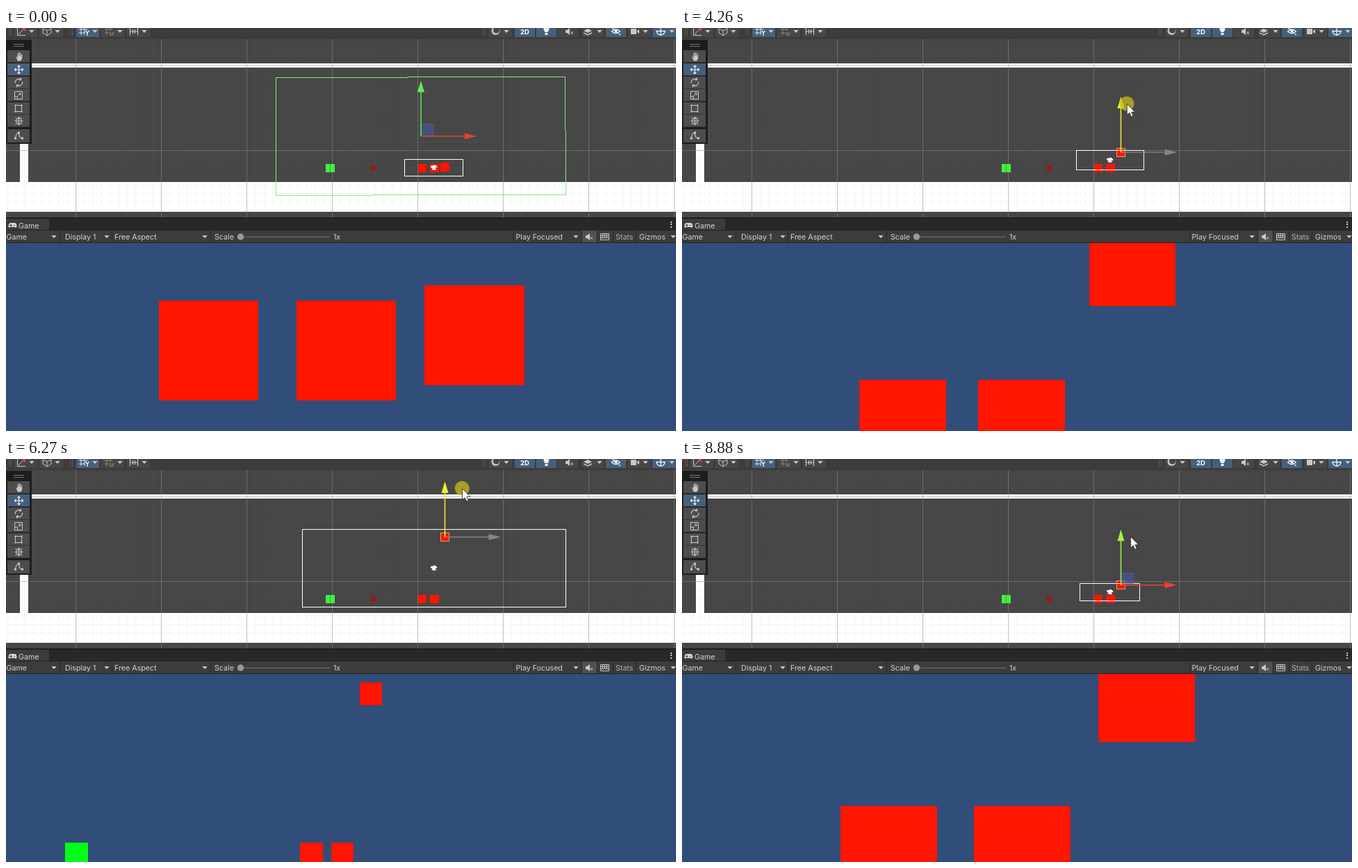
An HTML page with a canvas that plays this animation: 964x581 px, repeating every 9.04 s.

```html
<!DOCTYPE html>
<html lang="en">
<head>
<meta charset="utf-8">
<title>Group camera</title>
<style>
html, body { margin: 0; width: 100%; height: 100%; overflow: hidden; background: #314d79; }
canvas { display: block; }
</style>
</head>
<body>
<canvas id="stage" width="964" height="581"></canvas>
<script>
const ctx = document.getElementById('stage').getContext('2d');
const LOOP = 9040;
const RED = '#ff1500', ICON = '#c8c8c8';
const CAM_X = 615.6, BASE_Y = 202.4, UNIT = 12.64;
const GAME_TOP = 310, GAME_MID = 454;

// [time, value] knots
const HEIGHT = [[3790, 200.5], [3850, 196], [4680, 162], [4860, 155.6], [5590, 128.4], [6270, 112.5],
  [6480, 105], [6550, 105], [6720, 98], [7400, 98], [7630, 109.6], [8280, 153.7], [8800, 181.7]];
const DRAG_X = [[3790, 634], [3850, 634], [4860, 649.5], [6270, 656.5], [7630, 658], [8280, 652], [8800, 645.5]];

function track(knots, t) {
  if (t <= knots[0][0]) return knots[0][1];
  for (let i = 1; i < knots.length; i++) {
    const [t0, a] = knots[i - 1], [t1, b] = knots[i];
    if (t < t1) return a + (b - a) * (t - t0) / (t1 - t0);
  }
  return knots[knots.length - 1][1];
}
const mix = (a, b, k) => a + (b - a) * k;
const smooth = k => k * k * (3 - 2 * k);

function box(x, y, w, h, color) {
  ctx.fillStyle = color;
  ctx.fillRect(x, y, w, h);
}
// Filled square with its edges on whole pixels
function square(cx, cy, size, color) {
  const x = Math.round(cx - size / 2), y = Math.round(cy - size / 2);
  box(x, y, Math.round(cx + size / 2) - x, Math.round(cy + size / 2) - y, color);
}
function frame(x, y, w, h, color) {
  ctx.strokeStyle = color;
  ctx.lineWidth = 1;
  ctx.strokeRect(Math.round(x) + .5, Math.round(y) + .5, Math.round(w) - 1, Math.round(h) - 1);
}
function disc(x, y, r, color) {
  ctx.fillStyle = color;
  ctx.beginPath();
  ctx.arc(x, y, r, 0, 7);
  ctx.fill();
}
function shape(d, color, x = 0, y = 0) {
  ctx.save();
  ctx.translate(x, y);
  ctx.fillStyle = color;
  ctx.fill(new Path2D(d));
  ctx.restore();
}
function line(d, color, x = 0, y = 0, width = 1) {
  ctx.save();
  ctx.translate(x, y);
  ctx.strokeStyle = color;
  ctx.lineWidth = width;
  ctx.stroke(new Path2D(d));
  ctx.restore();
}
function label(text, x, y, color = '#d2d2d2', font = '10.7px') {
  ctx.font = font + ' Inter, Roboto, sans-serif';
  ctx.fillStyle = color;
  ctx.fillText(text, x, y);
}
const caret = (x, y) => shape('M-3.7 -2H3.7L0 2Z', ICON, x, y);

function drawGrid() {
  const minor = 'rgba(128,128,128,.08)', major = 'rgba(140,140,140,.5)';
  for (let x = 1.6; x < 964; x += 12.3) box(Math.round(x), 16, 1, 257, minor);
  for (let y = 29; y < 273; y += 12.3) box(0, Math.round(y), 964, 1, minor);
  for (let i = 0; i < 8; i++) box(Math.round(99.5 + i * 123), 16, 1, 257, major);
  box(0, 54, 964, 1, major);
  box(0, 176, 964, 1, major);
}

function drawRoom() {
  box(0, 16, 964, 257, '#464646');
  box(20, 51, 12, 172, '#fff');
  box(20, 51, 944, 6, '#fff');
  box(0, 222, 964, 43, '#fff');
  drawGrid();
}

function drawTopBar() {
  box(0, 0, 964, 16, '#3c3c3c');
  for (const [x, w, on] of [[12, 33], [48, 34], [101, 33, 1], [137, 33], [174, 33], [695, 33], [732, 29, 1],
    [763, 29, 1], [794, 29], [829, 31], [863, 29, 1], [895, 33], [930, 34, 1]])
    box(x, 0, w, 13, on ? '#46607c' : '#474747');
  for (const x of [4, 92, 686]) line('M.5 0V11M3.5 0V11', '#5c5c5c', x, 0);
  for (const x of [37, 74, 128, 164, 199, 720, 854, 920, 958]) caret(x, 5);
  line('M16.5 0V10.5H28M18 9L26 1', ICON);
  shape('M23 0H28V5Z', '#d2543c');
  line('M53 1L59 4L65 1V7L59 11L53 7ZM59 4V11', ICON);
  line('M105 2H118M105 7H114M108 0V10M113 0V10', '#e4e4e4');
  line('M114.5 4L117 7L119.5 4M117 7V11', '#fff', 0, 0, 1.3);
  line('M142 2H153M142 7H148M145 0V10M150 0V4', '#858585');
  line('M150 6V8A2 2 0 0 0 154 8V6', '#858585', 0, 0, 1.5);
  line('M178.5 0V10M189.5 0V10M179 5H189M182.5 2V8M185.5 2V8', ICON, 0, 0, 1.2);
  disc(704.5, 4, 6, ICON);
  disc(705.5, 3, 4.6, '#474747');
  label('2D', 740, 8.5, '#fff', 'bold 9.5px');
  shape('M773.5 0H781.5Q782 3 779.5 6H775.5Q773 3 773.5 0ZM775.5 7H779.5V10H775.5Z', '#f0f0f0');
  shape('M805 3H807L811 0V10L807 7H805Z', ICON);
  line('M812.5 5L816 9M816 5L812.5 9', ICON);
  shape('M831 4L837 1L843 4L837 7Z', ICON);
  line('M831 7L837 10L843 7', ICON, 0, 0, 1.4);
  line('M871.5 5Q877.5 -1 883.5 5Q877.5 10 871.5 5ZM872 0L884 10', '#f0f0f0', 0, 0, 1.3);
  disc(877.5, 4.5, 2, '#f0f0f0');
  shape('M899 1H907V9H899ZM908 4L911 2V8L908 6Z', ICON);
  line('M936 4A6 6 0 0 0 948 4M935 4.5H949M942 0V11', '#f0f0f0', 0, 0, 1.3);
}

function drawTools() {
  box(0, 17, 37, 150, '#1d1d1d');
  line('M11 23.5H26M11 26.5H26', '#777');
  [32, 51, 70, 88, 107, 125, 146].forEach((y, i) => box(2, y, 32, i === 6 ? 19 : 17.5, i === 1 ? '#46607c' : '#4d4d4d'));
  shape('M-5 -1L-2 2V-4.5H-.8V-1H-.2V-6H1V-1H1.6V-5H2.8V0H3.4V-3H4.7V2Q4 6 2 6.5H-1.5Z', ICON, 18.5, 41);
  line('M-6 0H6M0 -6V6M-4 -2L-6 0L-4 2M4 -2L6 0L4 2M-2 -4L0 -6L2 -4M-2 4L0 6L2 4', '#f0f0f0', 18.5, 60, 1.2);
  line('M-5 1A5 5 0 0 1 3 -4M5 -1A5 5 0 0 1 -3 4M3 -7V-3.5H0M-3 7V3.5H0', ICON, 18.5, 78.5, 1.2);
  line('M-5.5 -5.5H5.5V5.5H-5.5ZM-5.5 1.5H-1.5V5.5M-1 1L3 -3M0 -3H3V0', ICON, 18, 97);
  line('M-4.5 -4.5H4.5V4.5H-4.5Z', ICON, 18, 116);
  for (const x of [-5, 4]) for (const y of [-5, 4]) box(17.5 + x, 115.5 + y, 2, 2, ICON);
  line('M-6 0H6M0 -6V6M-2 -4L0 -6L2 -4M-2 4L0 6L2 4M-4 0A4 4 0 0 1 4 0A4 4 0 0 1 -4 0M-5 -5L-3 -3M5 -5L3 -3M-5 5L-3 3M5 5L3 3', ICON, 18.5, 134);
  line('M-5 4Q-4 -4 0 -4Q0 4 5 4', ICON, 18.5, 155, 1.2);
  for (const [x, y] of [[-5, 4], [0, -4], [5, 4]]) box(17 + x, 153.5 + y, 3, 3, ICON);
}

function drawGameBar() {
  box(0, 273, 964, 2, '#1e1e1e');
  box(0, 275, 964, 17, '#282828');
  box(0, 275, 62, 17, '#3c3c3c');
  box(0, 291, 964, 1, '#262626');
  box(0, 292, 964, 18, '#3c3c3c');
  box(0, 309, 964, 1, '#232323');
  shape('M6 281H13Q15.5 282 15.5 286Q15 289 12.5 287H6.5Q4 289 3.5 286Q3.5 282 6 281Z', '#d8d8d8');
  line('M5 284.5H9M7 282.5V286.5M11 284.5H13', '#3c3c3c');
  label('Game', 18, 288.5);
  for (const y of [279, 282, 286]) box(956, y, 2, 2, ICON);
  box(829, 292, 21, 17, '#505050');
  for (const x of [77, 152, 294, 730, 828, 850, 873, 906]) box(x, 292, 1, 17, '#262626');
  for (const x of [69, 145, 286, 820, 960]) caret(x, 301);
  label('Game', .5, 305);
  label('Display 1', 85, 305);
  label('Free Aspect', 156, 305);
  label('Scale', 300, 305);
  box(338, 300.5, 128, 1.5, '#626262');
  disc(337.5, 301, 4.7, '#999');
  label('1x', 471, 305);
  label('Play Focused', 733.5, 305);
  shape('M834 299H836L840 296V306L836 303H834Z', ICON);
  line('M841 301L844 304.5M844 301L841 304.5', ICON);
  line('M855.5 296.5H867.5V305.5H855.5ZM856 299.5H867M856 302.5H867M858.5 297V303M861.5 297V303M864.5 297V303', ICON);
  label('Stats', 877, 305, '#b0b0b0');
  label('Gizmos', 911, 305);
}

function gizmo(x, y, green, red, plane) {
  if (plane) {
    box(x, Math.round(y - 18), 18, 18, 'rgba(70,92,170,.52)');
    frame(x, y - 18, 18, 18, 'rgba(80,110,190,.5)');
  }
  line('M0 0H64', red, x, y, 1.4);
  shape('M63 -4.5L80.5 0L63 4.5Z', red, x, y);
  line('M0 0V-65', green, x, y, 1.5);
  shape('M-5 -63.5L0 -80L5 -63.5Z', green, x, y);
}

function drawScene(t, y, w) {
  const camY = (y + BASE_Y) / 2, h = w * 288 / 964;
  const picked = t >= 1940, dragging = t >= 3600 && t < 8850, hover = t >= 3450 && t < 8850;

  square(466.4, 202, UNIT, '#40f040');
  box(466, 196, 1, 12, '#35a835');
  square(599, 202.1, UNIT, RED);
  square(616.3, 202.1, UNIT, RED);
  square(631.6, y, UNIT, RED);
  disc(528.5, 202, 4.3, '#981818');
  shape('M-5 -1Q-4 -4 -1 -3Q1 -5 3 -3L5 -1L3 3H-3L-2 1Z', '#fff', CAM_X, camY);
  box(Math.round(CAM_X) + 2, Math.round(camY), 2, 2, '#c03020');
  frame(CAM_X - w / 2, camY - h / 2, w, h, '#fff');

  if (!picked) {
    line('M388.5 240.5V71.5H578V70.5H804.5V147.5M805.5 147.5V240.5H528V241.5H388.5V240', '#86ee82');
    gizmo(597, 156, '#5eec58', '#e0432c', true);
  } else {
    frame(631.6 - UNIT / 2, y - UNIT / 2, UNIT, UNIT, '#f4a05a');
    gizmo(631.5, y, hover ? '#f4ee38' : '#a2f04e', dragging ? '#868686' : '#f0402a', !dragging);
  }
}

function drawGame(gap, w) {
  const s = 964 / w, half = gap / 2 * s;
  const cube = (dx, dy, color) => square(482 + dx * s, GAME_MID + dy, UNIT * s, color);
  ctx.save();
  ctx.beginPath();
  ctx.rect(0, GAME_TOP, 964, 581 - GAME_TOP);
  ctx.clip();
  box(0, GAME_TOP, 964, 271, '#314d79');
  cube(-149.9, half, '#00ff18');
  cube(-16.75, half, RED);
  cube(.67, half, RED);
  cube(16.9, -half, RED);
  ctx.restore();
}

function drawCursor(t, y) {
  if (t < 2480) return;
  let x, cy;
  if (t < 3390) {
    const k = smooth(Math.min(1, (t - 2480) / 880));
    x = mix(12, 624, k);
    cy = mix(24, 126, k);
  } else {
    const k = smooth(Math.min(1, (t - 3390) / 210));
    x = t < 3790 ? mix(624, 634, k) : track(DRAG_X, t);
    cy = mix(-5, 0, k) + y - 69.7;
  }
  if (t >= 3600 && t < 8850) disc(x - .3, cy - .5, 10.5, 'rgba(200,188,28,.75)');
  const arrow = 'M0 0V16L3.7 12.7L6.2 18.3L8.8 17.2L6.4 11.7H11.5Z';
  shape(arrow, '#fff', x, cy);
  line(arrow, '#222', x, cy, .8);
}

function draw(now) {
  const t = now % LOOP;
  const y = track(HEIGHT, t);
  const gap = 1.012 * (BASE_Y - y);
  const w = Math.max(84.8, 4.173 * gap);
  drawRoom();
  drawScene(t, y, w);
  drawTopBar();
  drawTools();
  drawGameBar();
  drawGame(gap, w);
  drawCursor(t, y);
}

const start = performance.now();
function tick() {
  draw(performance.now() - start);
  requestAnimationFrame(tick);
}
tick();
</script>
</body>
</html>
```
